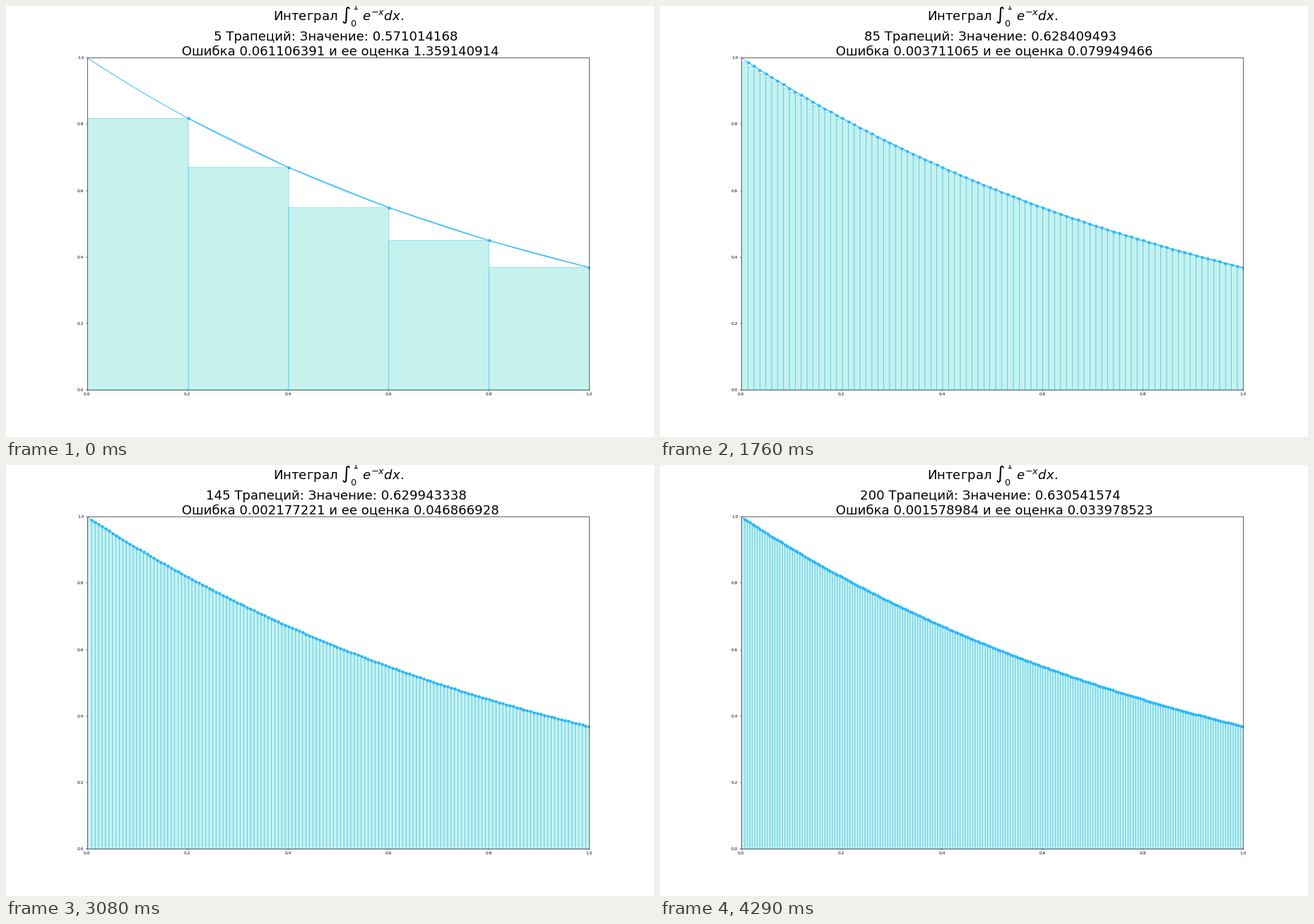
A matplotlib script that plays this animation: 917 px wide and 611 px high, repeating every 4.4 s.

```python
import numpy as np
import matplotlib.pyplot as plt
from matplotlib.animation import FuncAnimation
from matplotlib.collections import PolyCollection
from matplotlib.colors import to_rgba

W, H = 917, 611
DPI = W / 21
FRAMES, INTERVAL = 40, 110
STEP = 5
BLUE = "#29b6fa"
TEAL = "#44d7c6"
OFFSET = 0.0025  # small shift of the first grid node
EXACT = 1 - np.exp(-1)

plt.rcParams.update({
    "font.family": "DejaVu Sans",
    "mathtext.fontset": "dejavusans",
    "axes.linewidth": 1.0,
})

TITLE = (
    "Интеграл $\\int_{{0}}^{{1}}\\ e^{{-x}}dx$.\n"
    "{n} Трапеций: Значение: {value:.9f} \n"
    " Ошибка {error:.9f} и ее оценка {bound:.9f}"
)


def f(x):
    return np.exp(-x)


def right_sum(n):
    return f(np.arange(1, n + 1) / n).sum() / n


def bar_shapes(edges):
    return [
        [(a, 0), (a, f(b)), (b, f(b)), (b, 0)]
        for a, b in zip(edges[:-1], edges[1:])
    ]


# The tiny margin keeps the canvas from being truncated by a pixel.
fig, ax = plt.subplots(figsize=((W + 0.01) / DPI, (H + 0.01) / DPI), dpi=DPI)
fig.set_facecolor("white")
ax.set_xlim(0, 1)
ax.set_ylim(0, 1)

bars = PolyCollection(
    [],
    facecolors=to_rgba(TEAL, 0.3),
    edgecolors=to_rgba(BLUE, 0.6),
    linewidths=1.1,
    zorder=1,
)
bars.set_snap(False)
ax.add_collection(bars, autolim=False)

grid = np.linspace(0, 1, 400)
ax.plot(grid, f(grid), color=BLUE, lw=1.5)
nodes, = ax.plot([], [], "o-", color=BLUE, lw=1.5, ms=6)
title = ax.set_title("", fontsize=30)


def update(i):
    n = STEP * (i + 1)
    edges = np.linspace(OFFSET, 1, n + 1)
    edges[0] = 0
    bars.set_verts(bar_shapes(edges))
    nodes.set_data(edges[1:], f(edges[1:]))
    value = right_sum(n)
    title.set_text(TITLE.format(
        n=n, value=value, error=EXACT - value, bound=2.5 * np.e / n))
    return bars, nodes, title


anim = FuncAnimation(fig, update, frames=FRAMES, interval=INTERVAL,
                     repeat=True, repeat_delay=0, blit=False)
plt.show()
```
